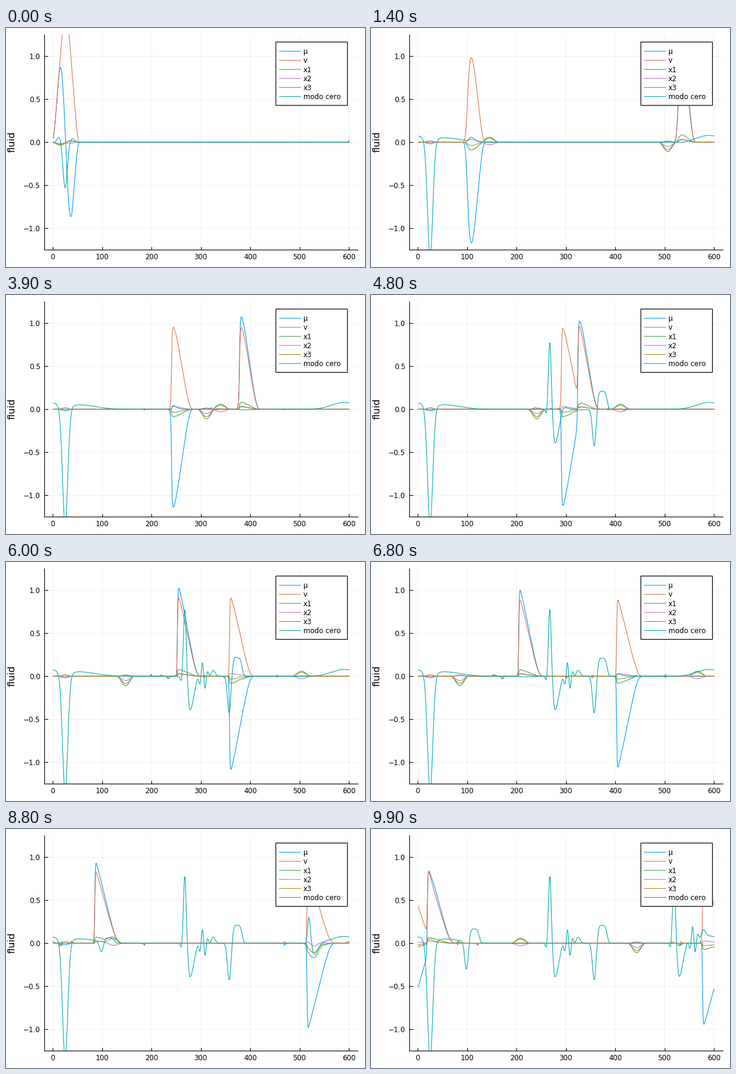
A matplotlib script for the animation above (10000 ms loop, 600x400 px).

```python
import numpy as np
import matplotlib.pyplot as plt
from matplotlib.animation import FuncAnimation
from matplotlib.patches import Rectangle

FRAMES, INTERVAL = 100, 100
N = 600
PX = 0.72  # points per pixel at 100 dpi
SERIES = {"µ": "#009AFA", "v": "#E36F47", "x1": "#3EA44E",
          "x2": "#C371D2", "x3": "#AC8E18", "modo cero": "#00AAAE"}
SLOW, FAST = 58, 78  # speeds of the large and the small pulses
NU = 1.0  # viscosity of the steepening pulses

x = np.arange(1, N + 1, dtype=float)
s = np.arange(-80, 80, 0.1)

plt.rcParams["font.family"] = "DejaVu Sans"


def wrap(c):
    """Signed periodic distance from c."""
    return (x - c + N / 2) % N - N / 2


def hump(d, w):
    return np.where(np.abs(d) < w, np.cos(np.pi * d / (2 * w)) ** 2, 0.0)


def bump(c, w):
    return hump(wrap(c), w)


def gauss(c, left, right=None):
    d = wrap(c)
    return np.exp(-0.5 * (d / np.where(d < 0, left, right or left)) ** 2)


def ease(t, a, b):
    u = np.clip((t - a) / (b - a), 0, 1)
    return u * u * (3 - 2 * u)


def settle(t, tau):
    return 1 - np.exp(-t / tau)


def pulse(c, t, k, w):
    """Viscous Burgers pulse (Cole-Hopf), steepening on its left side."""
    d = wrap(c)
    if t == 0:
        return hump(d, w)
    near = np.abs(d) < 75
    y = -d[near][:, None]
    mass = np.cumsum(k * hump(s, w)) * (s[1] - s[0])
    e = -((y - s) ** 2) / (4 * NU * t) - mass / (2 * NU)
    g = np.exp(e - e.max(axis=1, keepdims=True))
    u = np.zeros(N)
    u[near] = ((y - s) / t * g).sum(axis=1) / g.sum(axis=1) / k
    return u


def spike(c):
    """Left standing where a small pulse meets the right-moving large one."""
    return (0.79 * gauss(c, 2.7) - 0.06 * gauss(c - 7, 1.8)
            - 0.39 * gauss(c + 10.5, 3.5, 7.5))


def step(c):
    """Left standing where a small pulse meets the left-moving large one."""
    return 0.21 * np.exp(-(wrap(c + 16) / 11) ** 4) - 0.43 * gauss(c, 3.6)


def ripple(c):
    wave = np.cos(2 * np.pi * wrap(c - 2) / 11.5)
    return 0.17 * gauss(c, 6) * wave + 0.07 * gauss(c + 20, 4)


def zero_mode(t):
    grow = settle(t, 0.25)
    z = -(0.53 + 0.85 * grow) * gauss(25, 4.3 + grow)
    z += (1 - grow) * (0.065 * gauss(13, 4) + 0.045 * gauss(40, 4))
    z += ease(t, 0, 1.3) * (0.08 * gauss(590, 25) + 0.05 * gauss(55, 15, 33))
    for lap in range(2):
        meet = 4.1 + 4.5 * lap
        formed = ease(t, meet, meet + 0.5)
        z += formed * spike(267.5 + 251.5 * lap)
        z += formed * step(357.5 - 259 * lap) * (1 - 0.25 * lap)
        z += ease(t, meet + 0.7, meet + 1.2) * ripple(305 + 253.5 * lap)
    return z


def fields(t):
    early = settle(t, 0.3)
    right = pulse(33 + SLOW * t, t, 4.2, 21)
    left = pulse(19 + 3 * early - SLOW * t, t, 3.9, 21 - early)
    right *= 1 - 0.7 * early * left  # weakened while crossing
    ramp = 0.3 + 0.7 * early
    p = ramp * bump(36 + FAST * t, 20)
    q = ramp * bump(15.5 - FAST * t, 18)
    still = early * bump(25, 14)

    # faint waves sent out by the crossings
    out = ease(t, 4.5, 5.0)
    crest = out * (bump(688 - FAST * t, 4) + bump(FAST * t - 89, 6))
    dip = out * bump(702 - FAST * t, 5)

    mu = ((1 + 0.13 * early) * left - (1 + 0.19 * early) * right
          + 0.01 * q - 0.017 * still)
    v = left + right + 0.005 * p + 0.015 * q + 0.01 * crest
    x1 = early * (0.088 * left - 0.092 * right) + 0.06 * p - 0.11 * q
    x1 += 0.012 * crest - 0.03 * dip
    x2 = early * (0.03 * left + 0.035 * right) - 0.028 * p - 0.05 * q
    x3 = early * (0.035 * left - 0.037 * right) + 0.047 * p - 0.085 * q
    x3 += 0.02 * still + 0.015 * crest - 0.02 * dip
    z = zero_mode(t) + early * (0.05 * right ** 4 - 0.008 * left)
    return mu, v, x1, x2, x3, z


fig = plt.figure(figsize=(6, 4), dpi=100, facecolor="white")

L, R, T, B = 64.2, 588, 11.3, 371.3
ax = fig.add_axes([L / 600, 1 - B / 400, (R - L) / 600, (B - T) / 400])
ax.set_xlim(-16.97, 617.97)
ax.set_ylim(-1.25, 1.25)
ax.set_xticks(range(0, 601, 100))
ax.set_yticks([-1, -0.5, 0, 0.5, 1])
ax.tick_params(direction="in", length=5.5 * PX, width=1.1 * PX,
               labelbottom=False, labelleft=False)
ax.grid(color="black", alpha=0.08, linewidth=0.7 * PX, snap=False)
ax.set_axisbelow(True)
ax.spines[["top", "right"]].set_visible(False)
ax.spines[["left", "bottom"]].set_linewidth(1.1 * PX)
lines = [ax.plot([], [], color=c, linewidth=1.1 * PX)[0]
         for c in SERIES.values()]

# overlay in pixel units for labels and legend
top = fig.add_axes([0, 0, 1, 1], zorder=5)
top.set_xlim(0, 600)
top.set_ylim(400, 0)
top.axis("off")


def label(px, py, text, size=11.7, **kw):
    top.text(px, py, text, fontsize=size * PX, color="black", **kw)


for i in range(0, 601, 100):
    label(78 + 0.8252 * i, 387, str(i), ha="center", va="baseline")
for val in (-1, -0.5, 0, 0.5, 1):
    label(57.5, 195.8 - 144 * val, f"{val:.1f}".replace("-", "−"),
          ha="right", va="baseline")
label(10, 190.7, "fluid", 16.1, rotation=90, ha="center", va="center")

top.add_patch(Rectangle((451, 23.5), 119.6, 106, facecolor="white",
                        edgecolor="black", linewidth=1.2 * PX, snap=False))
for i, (name, color) in enumerate(SERIES.items()):
    row = 39 + 15.12 * i
    top.plot([457, 492.5], [row, row], color=color, linewidth=1.1 * PX,
             snap=False)
    label(497, row + 4.3, name, va="baseline")


def update(frame):
    for line, y in zip(lines, fields(frame * INTERVAL / 1000)):
        line.set_data(x, y)
    return lines


anim = FuncAnimation(fig, update, frames=FRAMES, interval=INTERVAL,
                     repeat=True, repeat_delay=0, blit=False)
plt.show()
```
